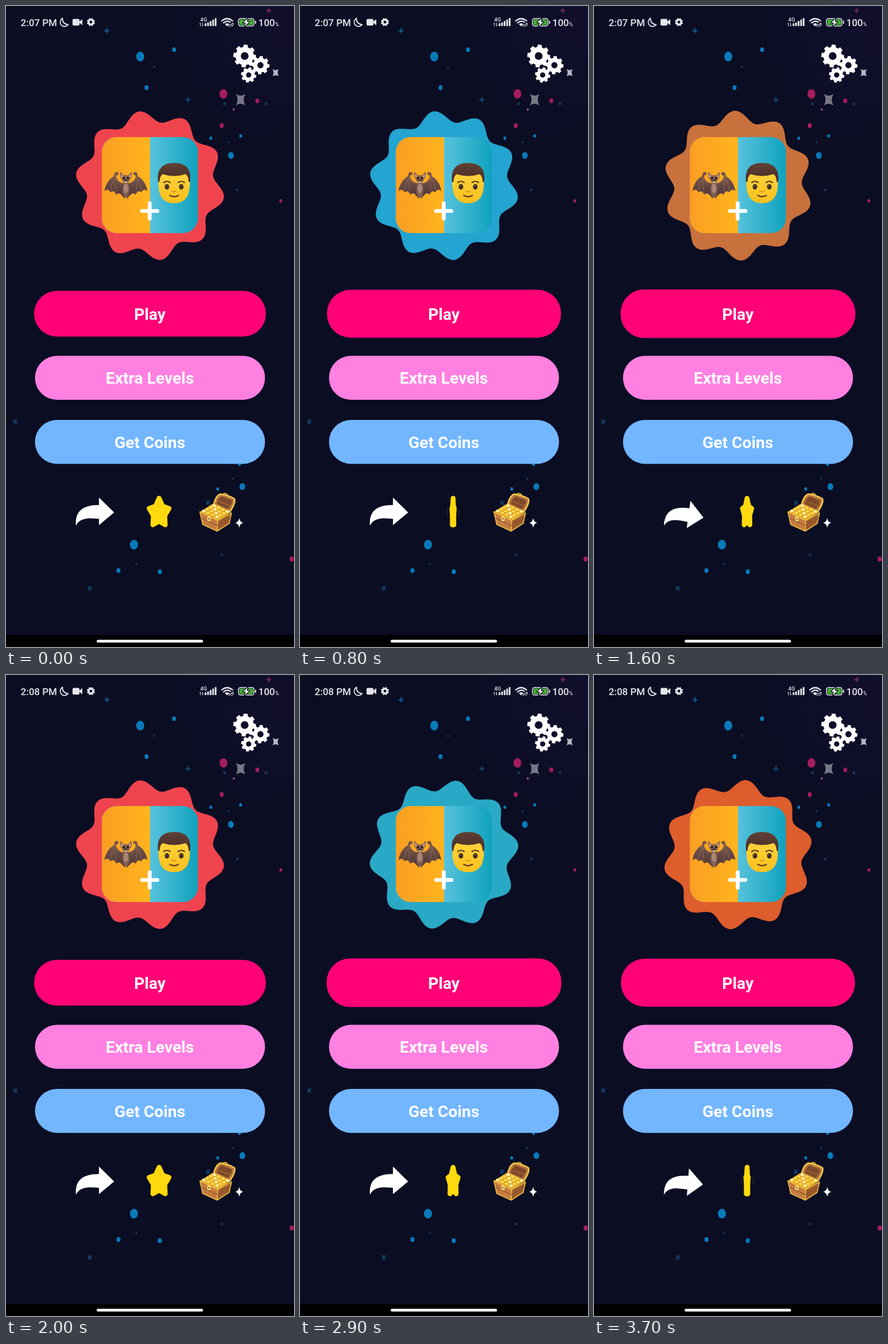
Recreate the animation shown at these times as an HTML page with a canvas. Size 502 by 1115 pixels, loop 3800 ms.

```html
<!DOCTYPE html>
<html lang="en">
<head>
<meta charset="utf-8">
<title>Emoji puzzle menu</title>
<style>
html, body { margin: 0; width: 100%; height: 100%; overflow: hidden; background: #0b0d23; }
canvas { display: block; width: 100vw; height: 100vh; }
</style>
</head>
<body>
<canvas id="stage" width="502" height="1115"></canvas>
<script>
const ctx = document.getElementById('stage').getContext('2d');
const TAU = Math.PI * 2;
const LOOP = 3800, STEP = 100, CYCLE = 2000;
const BLUE = '#087ab9', PINK = '#a51d5c', DIM = '#123d62';

// Rows: time in the cycle, then the values reached there.
const BADGE = [
  [0, 9.5, 239, 68, 78], [500, 96, 150, 98, 160], [800, 154, 36, 164, 208],
  [1300, 245.7, 63, 191, 155], [1600, 303.5, 200, 113, 60],
  [1700, 312.6, 222, 93, 45], [2000, 369.5, 239, 68, 78]
];
const STAR = [[0, 138], [500, 221], [800, 275], [1300, 360], [1600, 430], [1700, 445], [2000, 498]];
const ARROW = [[0, 0], [1000, 0], [1300, 5.2], [1600, 7.7], [1700, 4.4], [2000, 0]];

function track(rows, time) {
  const i = Math.max(1, rows.findIndex(row => row[0] >= time));
  const a = rows[i - 1], b = rows[i];
  const k = (time - a[0]) / (b[0] - a[0]);
  return a.slice(1).map((v, j) => v + (b[j + 1] - v) * k);
}

function fill(path, color) {
  ctx.fillStyle = color;
  ctx.fill(new Path2D(path), 'evenodd');
}

function stroke(path, color, width) {
  ctx.strokeStyle = color;
  ctx.lineWidth = width;
  ctx.lineCap = ctx.lineJoin = 'round';
  ctx.stroke(new Path2D(path));
}

function ellipse(x, y, rx, ry, color) {
  ctx.fillStyle = color;
  ctx.beginPath();
  ctx.ellipse(x, y, rx, ry, 0, 0, TAU);
  ctx.fill();
}

function pill(x, y, w, h, r, color) {
  ctx.fillStyle = color;
  ctx.beginPath();
  ctx.roundRect(x, y, w, h, r);
  ctx.fill();
}

function text(str, x, y, size, weight, color = '#fff', align = 'left') {
  ctx.font = `${weight} ${size}px Roboto, sans-serif`;
  ctx.textAlign = align;
  ctx.fillStyle = color;
  ctx.fillText(str, x, y);
}

function gradient(x0, y0, x1, y1, ...colors) {
  const g = ctx.createLinearGradient(x0, y0, x1, y1);
  colors.forEach((c, i) => g.addColorStop(i / (colors.length - 1), c));
  return g;
}

function placed(x, y, draw, angle = 0, sx = 1, sy = 1) {
  ctx.save();
  ctx.translate(x, y);
  ctx.rotate(angle);
  ctx.scale(sx, sy);
  draw();
  ctx.restore();
}

function sparkle(x, y, rx, ry, color) {
  placed(x, y, () => fill('M0-1Q.15-.15 1 0Q.15.15 0 1Q-.15.15-1 0Q-.15-.15 0-1Z', color), 0, rx, ry);
}

function pinched(x, y, rx, ry, color) {
  placed(x, y, () => fill('M-1-1Q0-.4 1-1Q.3 0 1 1Q0 .4-1 1Q-.3 0-1-1Z', color), 0, rx, ry);
}

function gear(x, y, r, hole, angle, color) {
  ctx.fillStyle = color;
  ctx.beginPath();
  for (let i = 0; i < 8; i++) {
    [[-.32, .8], [-.22, 1], [.22, 1], [.32, .8]].forEach(([offset, k]) => {
      const a = angle + (i + offset) * TAU / 8;
      ctx.lineTo(x + r * k * Math.cos(a), y + r * k * Math.sin(a));
    });
  }
  ctx.closePath();
  ctx.moveTo(x + hole, y);
  ctx.arc(x, y, hole, 0, TAU, true);
  ctx.fill('evenodd');
}

function background() {
  ctx.fillStyle = '#0b0d23';
  ctx.fillRect(0, 0, 502, 1115);
  const glow = ctx.createRadialGradient(502, 40, 20, 502, 40, 210);
  glow.addColorStop(0, '#110f2c');
  glow.addColorStop(1, '#0b0d23');
  fill('M280 0H502V188L402 270L280 250Z', glow);

  [[234, 88, 7], [293, 76, 3.4], [245, 142, 3.5], [357, 230, 2.4], [409, 226, 2.5], [392, 260, 5],
   [412, 836, 5], [407, 797, 2.6], [369, 840, 2.5], [223, 937, 7], [196, 982, 3.5], [268, 984, 3.6]
  ].forEach(([x, y, r]) => ellipse(x, y, r, r * 1.2, BLUE));
  [[258, 106], [396, 822], [227, 971], [388, 237]].forEach(([x, y]) => ellipse(x, y, 1.7, 2, DIM));
  [[379, 153, 6.8], [438, 165, 3.4], [376, 208, 3.5], [479, 339, 2.4], [498, 962, 3.7]
  ].forEach(([x, y, r]) => ellipse(x, y, r, r * 1.2, PINK));
  ellipse(397, 180, 1.8, 2, '#a8558b');

  sparkle(176, 43, 6, 6.5, '#124d7a');
  sparkle(317, 163, 6, 6.5, '#123f63');
  sparkle(458, 8, 5.5, 6, '#642451');
  sparkle(403, 320, 3.5, 4, DIM);
  sparkle(376, 955, 4, 4.5, '#123353');
  [[381, 170, 2.6], [453, 170, 2.6], [16, 723, 4], [146, 1013, 4], [352, 864, 4]
  ].forEach(([x, y, r]) => pinched(x, y, r, r * 1.15, DIM));
  pinched(409, 163, 8.3, 10, '#777785');
  pinched(470, 116, 5.5, 6.5, '#b7b7c3');
}

function statusBar(time) {
  const ink = '#e5e6eb';
  text(time < 1700 ? '2:07 PM' : '2:08 PM', 25.5, 35, 17, 500, ink);
  stroke('M98.5 21Q92.5 26 95.5 32Q101 39 108.5 32.5Q97.5 31 98.5 21Z', ink, 1.7);
  pill(116, 22.5, 12, 11.5, 2, ink);
  fill('M128 27L133 23V33.5L128 29.5Z', ink);
  gear(148, 28, 7.2, 2.4, .39, ink);

  text('4G', 338.5, 26.5, 9.5, 500, ink);
  stroke('M339 35V29.5L337.5 31M342.5 29.5V35L344 33.3', ink, 1);
  [5, 6.5, 9, 11.5, 14].forEach((h, i) => pill(346.3 + i * 4.4, 35 - h, 3, h, 1, ink));
  stroke('M376 26Q385.5 18 395 26M379.2 29.3Q385.5 24 391 28.2', ink, 2.2);
  fill('M381.5 31.5Q385.5 28.5 389 31.5L385.3 35.5Z', ink);
  stroke('M391 34L395 30M390 31.5Q387 35 390 36M393 35.5Q397 34 396 30', ink, 1.1);

  pill(404.5, 21, 28.5, 14.5, 4.5, ink);
  pill(406, 22.5, 25.5, 11.5, 3, '#16202a');
  pill(407, 23.5, 23.5, 9.5, 2, '#45ad32');
  pill(434, 25.5, 2, 5.5, 1, ink);
  const bolt = 'M421 22L413.5 29H418L416.5 35L424 27.5H419.5Z';
  stroke(bolt, '#16202a', 3);
  fill(bolt, '#fff');
  text('100', 439.8, 35, 17, 500, ink);
  text('%', 469, 35, 9, 500, ink);
}

function badge(phase) {
  const [turn, r, g, b] = track(BADGE, phase);
  ctx.fillStyle = `rgb(${r},${g},${b})`;
  ctx.beginPath();
  for (let a = 0; a < 360; a++) {
    const angle = (a + turn) * TAU / 360;
    const radius = 120.8 + 9.6 * Math.cos(a * 10 * TAU / 360);
    ctx.lineTo(251 + radius * Math.cos(angle), 312.5 + radius * Math.sin(angle));
  }
  ctx.fill();
}

function bat() {
  const wing = 'M0 309L6 308Q14 306 17 298Q18 294 13 293.5Q12 289 16 288.5Q21 289 20.5 296Q34 303 37.5 322'
    + 'Q31 316 27 324Q21 319 17 328Q11 323 6 331L0 333Z';
  for (const side of [-1, 1]) {
    placed(209, 0, () => {
      fill(wing, gradient(0, 296, 0, 331, '#78564d', '#503836'));
      stroke('M8 309Q17 306 19 297Q25 309 27 321M18.5 301Q20 315 17 325', '#8b6558', 1.1);
      fill('M1 298L9.5 288.5Q11.5 297 6 303Z', '#6e4d45');
      fill('M3 298L8.5 291Q9.5 297 6 301Z', '#d3a38a');
    }, 0, side, 1);
  }
  ellipse(209, 320, 6, 13.5, '#815e52');
  ellipse(209, 317, 4.2, 8.5, '#aa8573');
  ellipse(209, 301, 7, 7, '#8a6656');
  for (const side of [-1, 1]) {
    ellipse(209 + side * 3.4, 299.5, 2, 2.2, '#271c1b');
    stroke(`M${209 + side * 3} 331V334.5`, '#5c413b', 1.5);
  }
  ellipse(209, 303.5, 2.4, 1.7, '#3d2825');
  fill('M207 305L208 308L209 305L210 308L211 305Z', '#fff');
}

function face() {
  fill('M265.5 308Q266 278 293 278Q320 278 320.5 308Q321 343 293 343Q265 343 265.5 308Z',
    gradient(0, 280, 0, 343, '#ffd740', '#f9c01e'));
  fill('M265 306Q261 273 293 273Q325 273 321 306L318.5 306Q318 296 313 292.5Q293 299 273 292.5Q268 296 267.5 306Z',
    gradient(0, 273, 0, 306, '#624035', '#452e29'));
  for (const side of [-1, 1]) {
    const x = 293 + side * 12.5;
    ellipse(x, 314.5, 4, 4.8, '#402f29');
    ellipse(x - 1.2, 312.8, 1, 1.2, '#806b5f');
    stroke(`M${x - 5.5} 307Q${x} 303 ${x + 5.5} 307`, '#573d2c', 2.2);
  }
  stroke('M289.5 322Q293 325 296.5 322', '#dc981f', 2.2);
  stroke('M285.5 329.5Q293 334 300.5 329.5', '#673c28', 2.3);
}

function tile() {
  pill(167, 228, 167.5, 167, 26, gradient(251, 0, 335, 0, '#57c2dc', '#0fa2bd'));
  pill(167, 228, 84, 167, [26, 0, 0, 26], gradient(167, 0, 251, 0, '#fb9e24', '#ffb41d'));
  bat();
  face();
  stroke('M237 356.5H264M250.5 343V370', '#fff', 6.6);
}

function buttons(phase) {
  const grow = 6.3 * (1 - Math.abs(phase - 1250) / 1000);
  const d = Math.abs(grow);
  pill(50.5 - d, 497 - d, 401 + 2 * d, 76.5 + 2 * d, 41, '#ff0276');
  pill(50.5, 608.5, 401, 76.5, 38.2, '#ff80e1');
  pill(50.5, 720, 401, 76.5, 38.2, '#72b6ff');
  ['Play', 'Extra Levels', 'Get Coins'].forEach((label, i) =>
    text(label, 250.7, 545.5 + i * 111.5, 28.3, 700, '#fff', 'center'));
}

function shareArrow(phase) {
  placed(122, 903, () => fill(
    'M0 1C-2-22 9-35 40-35V-48L66.5-22L40 0V-11C24-12 7-14 0 1Z', '#fff'
  ), track(ARROW, phase)[0] * TAU / 360);
}

function star(phase) {
  const width = Math.abs(Math.cos(track(STAR, phase)[0] * TAU / 360));
  if (width < .2) {
    ctx.strokeStyle = '#3b3c35';
    ctx.lineWidth = .7;
    ctx.beginPath();
    ctx.arc(267, 881, 11, 0, TAU);
    ctx.stroke();
  }
  // The outline keeps its weight while the shape turns, which gives the star its thickness.
  let path = '';
  for (let i = 0; i < 10; i++) {
    const r = i % 2 ? 14 : 24.5, a = (i / 10 - .25) * TAU;
    path += `${i ? 'L' : 'M'}${r * width * Math.cos(a)} ${r * 1.04 * Math.sin(a)}`;
  }
  placed(266.8, 881.8, () => {
    fill(path, '#ffd90d');
    stroke(path + 'Z', '#ffd90d', 8.5);
  });
}

function chest() {
  const lid = 'M362 867Q366 851 374 849Q390 852 398 857Q401 864 390 880Z';
  stroke('M378 852Q378 846 385 849L387 854', '#dcae35', 2);
  fill(lid, '#b8763a');
  fill('M367 866Q370 856 376 853L394 860Q394 867 387 875Z', '#7d4a2a');
  stroke(lid, '#f3c74c', 2.6);
  stroke('M371 862L390 869', '#a7652f', 1.6);
  fill('M338 880L369 895L368 913.5L343 902Z', '#c57c40');
  fill('M369 895L393 882L389 900L368 913.5Z', '#9c5a2d');
  fill('M338 880L360 866L393 880L369 895Z', '#f0b429');
  for (let i = 0; i < 16; i++) {
    const u = (i % 4) / 3, v = Math.floor(i / 4) / 3;
    const x = 345 + u * 23 + v * 18, y = 879 + u * 10 - v * 9;
    ellipse(x, y, 3.8, 3, '#d2941c');
    ellipse(x, y - .6, 3.3, 2.4, i % 3 ? '#ffd84a' : '#fff0a0');
  }
  stroke('M338 880L369 895L393 882M369 895L368 913.5M338 880L343 902L368 913.5L389 900L393 882', '#eab944', 1.8);
  stroke('M341 891L368.5 904L391 891', '#87502a', 1.2);
  pill(351, 888, 5.5, 8, 1.5, '#ffe07a');
  ellipse(353.7, 892, 1, 1.7, '#65401e');
  sparkle(406.5, 899, 7, 8.5, '#fff');
}

function settings() {
  gear(416, 87, 20, 6.8, .1, '#fff');
  gear(443.5, 103, 16, 5.4, .1, '#fff');
  gear(423, 120, 13.5, 4.6, .2, '#fff');
}

function navBar() {
  ctx.fillStyle = '#000';
  ctx.fillRect(0, 1094, 502, 21);
  pill(158, 1102.5, 185.5, 4.8, 2.4, '#fff');
}

function render(now) {
  const time = Math.floor((now % LOOP) / STEP) * STEP;
  const phase = time % CYCLE;
  background();
  statusBar(time);
  settings();
  badge(phase);
  tile();
  buttons(phase);
  shareArrow(phase);
  star(phase);
  chest();
  navBar();
  requestAnimationFrame(render);
}
requestAnimationFrame(render);
</script>
</body>
</html>
```
